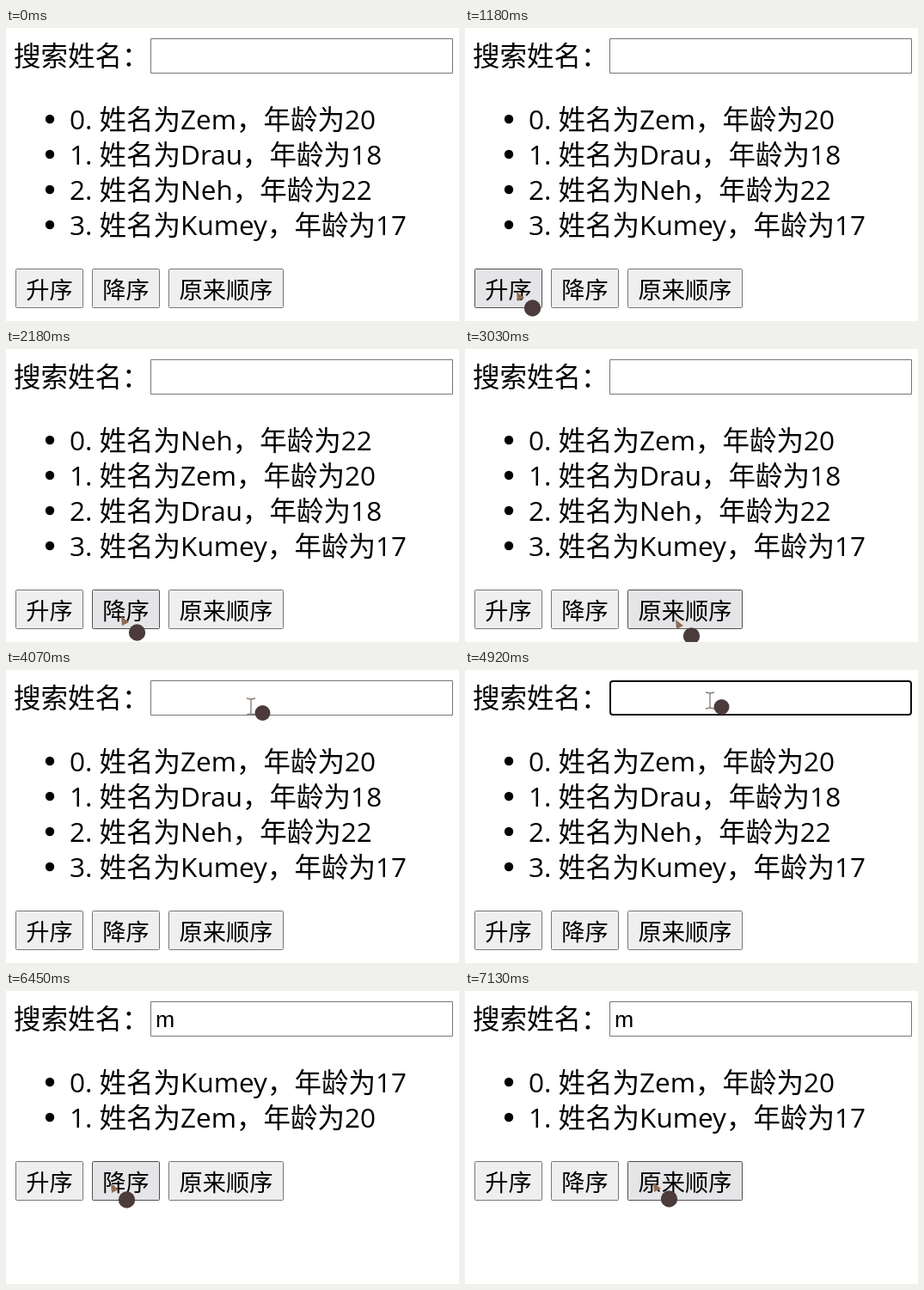
Recreate the animation shown at these times as an HTML page with a canvas. Size 527 by 341 pixels, loop 7.3 s.

```html
<!DOCTYPE html>
<html lang="zh-CN">
<head>
<meta charset="utf-8">
<title>列表排序</title>
<style>
html, body { margin: 0; width: 100%; height: 100%; overflow: hidden; background: #fff; }
canvas { display: block; }
</style>
</head>
<body>
<canvas id="stage" lang="zh-CN"></canvas>
<script>
const W = 527, H = 341, LOOP = 7300, ROW = 41;
const CJK = '"Noto Sans CJK SC", "Noto Sans CJK", sans-serif';
const canvas = document.getElementById('stage');
const ctx = canvas.getContext('2d');
const ratio = window.devicePixelRatio || 1;
canvas.width = W * ratio;
canvas.height = H * ratio;
canvas.style.width = W + 'px';
canvas.style.height = H + 'px';

const people = [
  { name: 'Zem', age: 20 },
  { name: 'Drau', age: 18 },
  { name: 'Neh', age: 22 },
  { name: 'Kumey', age: 17 }
];
const buttons = [
  { label: '升序', x: 11, w: 79 },
  { label: '降序', x: 100, w: 79 },
  { label: '原来顺序', x: 189, w: 134 }
];

// Each step keeps every value it does not mention: [time, changes]
const steps = [
  [0, { x: null, y: 0, order: 0, query: '', focus: false, caret: false }],
  [500, { x: 92, y: 334 }],
  [670, { x: 78, y: 321 }],
  [840, { x: 66, y: 312 }],
  [1010, { x: 61, y: 308 }],
  [1180, { x: 60, y: 307 }],
  [1340, { order: 1 }],
  [1510, { x: 66, y: 308 }],
  [1680, { x: 96, y: 310 }],
  [1850, { x: 126, y: 311 }],
  [2020, { x: 134, y: 311, order: -1 }],
  [2350, { x: 152, y: 312 }],
  [2520, { x: 206, y: 314 }],
  [2690, { x: 240, y: 315 }],
  [2860, { x: 245, y: 315 }],
  [3030, { order: 0 }],
  [3210, { x: 247, y: 300 }],
  [3380, { x: 258, y: 222 }],
  [3550, { x: 274, y: 120 }],
  [3730, { x: 283, y: 67 }],
  [4070, { x: 285, y: 42 }],
  [4240, { x: 285, y: 36 }],
  [4410, { focus: true, caret: true }],
  [4580, { x: 285, y: 35 }],
  [4920, { caret: false }],
  [5090, { query: 'm', caret: true }],
  [5260, { x: 270, y: 68 }],
  [5430, { x: 218, y: 143 }],
  [5600, { x: 160, y: 203, caret: false }],
  [5770, { x: 134, y: 220 }],
  [5940, { x: 64, y: 226, focus: false }],
  [6110, { x: 60, y: 226, order: 1 }],
  [6280, { x: 74, y: 225 }],
  [6450, { x: 122, y: 224 }],
  [6620, { x: 136, y: 224, order: -1 }],
  [6790, { x: 160, y: 224 }],
  [6960, { x: 210, y: 223 }],
  [7130, { x: 219, y: 223, order: 0 }]
];

function stateAt(time) {
  return Object.assign({}, ...steps.filter(([at]) => at <= time).map(([, change]) => change));
}

function visiblePeople({ query, order }) {
  const list = people.filter(person => person.name.includes(query));
  return order ? list.sort((a, b) => order * (a.age - b.age)) : list;
}

function text(string, x, y, font, align = 'left') {
  ctx.font = font;
  ctx.textAlign = align;
  ctx.fillStyle = '#000';
  ctx.fillText(string, x, y);
}

function frameRect(x, y, w, h, fill, stroke, line, radius) {
  ctx.beginPath();
  ctx.roundRect(x + line / 2, y + line / 2, w - line, h - line, radius);
  ctx.fillStyle = fill;
  ctx.fill();
  ctx.lineWidth = line;
  ctx.strokeStyle = stroke;
  ctx.stroke();
}

function dot(x, y, radius, color) {
  ctx.beginPath();
  ctx.arc(x, y, radius, 0, Math.PI * 2);
  ctx.fillStyle = color;
  ctx.fill();
}

function isOver({ x, y }, left, top, width, height) {
  return x !== null && x >= left && x <= left + width && y >= top && y <= top + height;
}

function drawSearch(state) {
  text('搜索姓名：', 9, 44, `31.5px ${CJK}`);
  if (state.focus) frameRect(168, 12, 352, 41, '#fff', '#100a10', 2, 3);
  else frameRect(168, 12, 352, 41, '#fff', '#767676', 1, 0);
  text(state.query, 174, 42, '26.67px "Liberation Sans", Arial, sans-serif');
  if (state.caret) {
    ctx.fillStyle = '#000';
    ctx.fillRect(state.query ? 197 : 174, 18, 2, 30);
  }
}

function drawList(list) {
  list.forEach(({ name, age }, i) => {
    const y = 118 + i * ROW;
    dot(51, y - 12, 5.2, '#000');
    text(`${i}. 姓名为${name}，年龄为${age}`, 74, y, `31.5px "Open Sans", ${CJK}`);
  });
}

function drawButtons(state, top) {
  for (const { label, x, w } of buttons) {
    const hover = isOver(state, x, top, w, 46);
    frameRect(x, top, w, 46, hover ? '#e5e5e8' : '#efefef', hover ? '#4f4f4f' : '#767676', 1, 1);
    text(label, x + w / 2, top + 35, `27.2px ${CJK}`, 'center');
  }
}

function drawPointer(state) {
  const { x, y } = state;
  if (x === null) return;
  if (isOver(state, 168, 12, 352, 41)) {
    ctx.beginPath();
    for (const side of [-1, 1]) {
      ctx.moveTo(x + side * 5, y - 9);
      ctx.lineTo(x, y - 8);
      ctx.lineTo(x, y + 9);
      ctx.lineTo(x + side * 5, y + 10);
    }
    ctx.lineWidth = 1.3;
    ctx.strokeStyle = '#86786f';
    ctx.stroke();
    dot(x + 13.5, y + 8, 9, '#4b3c3b');
    return;
  }
  ctx.beginPath();
  ctx.moveTo(x, y);
  ctx.lineTo(x + 9, y + 7);
  ctx.lineTo(x + 1, y + 11);
  ctx.closePath();
  ctx.fillStyle = '#8f6c52';
  ctx.fill();
  dot(x + 18.5, y + 19, 9.7, '#4b3c3b');
}

function render(now) {
  const state = stateAt(now % LOOP);
  const list = visiblePeople(state);
  ctx.setTransform(ratio, 0, 0, ratio, 0, 0);
  ctx.fillStyle = '#fff';
  ctx.fillRect(0, 0, W, H);
  drawSearch(state);
  drawList(list);
  drawButtons(state, 116 + list.length * ROW);
  drawPointer(state);
}

const start = performance.now();
function tick() {
  render(performance.now() - start);
  requestAnimationFrame(tick);
}
tick();
</script>
</body>
</html>
```
